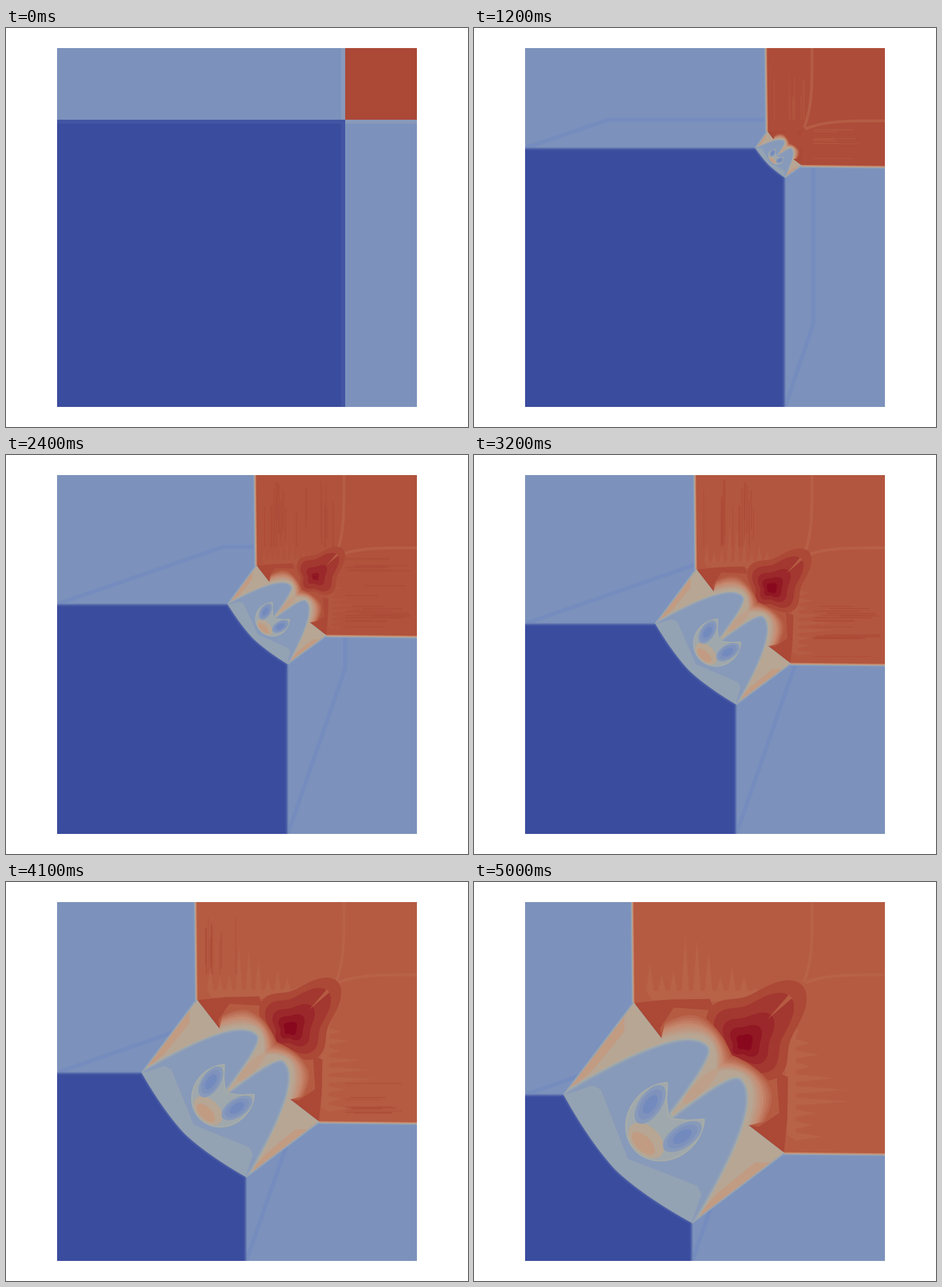
These frames come from a looping animation (805 px wide and 696 px high, 5100 ms). A matplotlib script:

```python
import numpy as np
import matplotlib.pyplot as plt
from matplotlib.animation import FuncAnimation
from matplotlib.patches import Polygon

W, H, DPI = 805, 696, 100
LEFT, TOP, RIGHT, BOTTOM = 89, 35, 716, 661
CX, CY = 591, 160            # where the four states meet
FRAMES = 51

BLUE = (58, 76, 158)
LIGHT = (124, 146, 188)
FAINT = (117, 140, 190)
DEEP = (115, 138, 190)
LOBE = (136, 154, 186)
MIST = (148, 163, 179)
GREY = (166, 172, 168)
BEIGE = (183, 166, 148)
SALMON = (194, 155, 131)
ORANGE = (198, 138, 112)
PALE_RED = (187, 103, 76)
RED = (171, 72, 54)
LATE_RED = (181, 91, 66)
DARK_RED = (138, 8, 30)

# Points are (u, v): along and across the diagonal, at full growth
TRIPLE, WING, DENT = (181.5, 130.5), (323, 111), (188.5, 75.5)
WEDGE = [TRIPLE, (148, 103), (112, 68), (118, 54), (151, 92), (181, 86), DENT]
STRIPE = [WING, (275, 108), (215, 114), (202, 127)]
BAND_EDGE = [WING, (290, 95), (286, 84), (323, 0)]

rng = np.random.default_rng(4)
STREAKS = rng.uniform((15, 0, 50, 1), (305, 70, 120, 3.5), (46, 4))

fig = plt.figure(figsize=(W / DPI, H / DPI), dpi=DPI, facecolor="white")
ax = fig.add_axes([LEFT / W, 1 - BOTTOM / H,
                   (RIGHT - LEFT) / W, (BOTTOM - TOP) / H])


def mix(c0, c1, k):
    return tuple(a + (b - a) * k for a, b in zip(c0, c1))


def add(pts, clip=None, **style):
    patch = ax.add_patch(Polygon(pts, **style))
    if clip is not None:
        patch.set_clip_path(clip)
    return patch


def fill(pts, color, alpha=1, clip=None):
    return add(pts, clip, facecolor=mix((0,) * 3, color, 1 / 255), lw=0,
               alpha=alpha)


def stroke(pts, color, width, closed=False, alpha=1, clip=None):
    return add(pts, clip, closed=closed, fill=False, alpha=alpha,
               edgecolor=mix((0,) * 3, color, 1 / 255),
               lw=width * 72 / DPI, joinstyle="bevel")


def box(x0, y0, x1, y1, color):
    fill([(x0, y0), (x1, y0), (x1, y1), (x0, y1)], color)


def both(draw_fn, pts, *args, **kw):
    """Draw a shape and its mirror image across the diagonal."""
    draw_fn(pts, *args, **kw)
    draw_fn(CX + CY - np.asarray(pts)[:, ::-1], *args, **kw)


def sym(half):
    half = np.asarray(half, float)
    return np.vstack([half, half[::-1] * (1, -1)])


def xy(uv):
    u, v = np.asarray(uv, float).T
    return np.column_stack([CX - u - v, CY + u - v])


def grown(uv, t):
    """Place points at growth t; the leading front speeds up slightly."""
    u, v = np.asarray(uv, float).T
    return xy(np.column_stack([u * t ** (.744 + .00086 * u), v * t ** 1.05]))


def oval(u, v, ru, rv, tilt=0):
    a = np.linspace(0, 2 * np.pi, 60)
    du = ru * np.cos(a)
    return np.column_stack([u + du, v + rv * np.sin(a) + tilt * du])


def bow_curve():
    v = np.linspace(WING[1], 0, 30)
    return np.column_stack([343 - 20 * (v / WING[1]) ** 1.6, v])


def lobe_curve():
    """From the wing around the rounded tip and back down the stem."""
    q = np.linspace(1, 0, 40)
    outer = np.column_stack([158 + 165 * q ** 2, 29 + 82 * q])
    stem = np.column_stack([158 + 93 * q ** 2, 29 - 24 * q])
    return np.vstack([outer, stem[::-1]])


def head_curve():
    a = np.linspace(2.35, 0, 40)
    arc = np.column_stack([258 + 51 * np.cos(a), 45 * np.sin(a)])
    return np.vstack([[(250, 3), (238, 18)], arc])


def jet_curve(k):
    """Front of the jet: k = 0 at the red side, 1 beside the lobes."""
    v = np.linspace(1, 0, 50)
    w = 88 * v - 46
    out = 132 + .0047 * w ** 2 + 9.2e-6 * np.maximum(w, 0) ** 4
    inner = 148 + .022 * (DENT[1] * v - 32) ** 2
    v = v * (88 + (DENT[1] - 88) * k)
    return np.vstack([[DENT], np.column_stack([out + (inner - out) * k, v])])


def spike_curve():
    """Ragged pale fringe above the red wedge."""
    x = np.linspace(300, 545, 37)
    height = rng.uniform(25, 105, 37) * np.clip((500 - x) / 120, .1, 1)
    y = 190 - np.where(np.arange(37) % 3 == 1, height, 0)
    x, y = np.append(x, [480, 310]), np.append(y, [210, 206])
    a, b = CX - x, y - CY
    return np.column_stack([(a + b) / 2, (a - b) / 2])


BOW, LOBES, HEAD, SPIKES = bow_curve(), lobe_curve(), head_curve(), spike_curve()


def draw_start():
    box(LEFT, CY, CX, BOTTOM, BLUE)
    box(LEFT, CY, CX, CY + 7, (66, 84, 163))
    box(CX - 7, CY, CX, BOTTOM, (66, 84, 163))
    box(CX - 7, TOP, CX, CY, LOBE)
    box(CX, CY, RIGHT, CY + 7, LOBE)
    box(CX, TOP, RIGHT, CY, RED)


def draw_low_states(n, t):
    """Faint advected waves and the blue quadrant."""
    bow = grown(sym(BOW), t)
    reach = LEFT + 12.08 * n
    wave = [(LEFT + 3, bow[0, 1] - 2), (reach, CY), (max(reach, CX), CY)]
    both(stroke, wave, FAINT, 7)
    far = LEFT - 20, BOTTOM + 20
    edge = np.vstack([[(far[0], bow[0, 1])], bow, [(bow[-1, 0], far[1])]])
    edge += (-2, 2)
    for k in (.2, .4, .6, .8):
        stroke(edge, mix(LIGHT, BLUE, k), 11 * (1 - k))
    fill(np.vstack([edge, [far]]), BLUE)
    stroke(edge, mix(LIGHT, BLUE, .85), 2)


def draw_streaks(t, reach):
    span = 125 * np.sin(np.pi * t ** .75) + 15
    early = t < .35
    for a, y, length, width in STREAKS:
        if 4 < reach - a < span:
            top = TOP + y + 35 * early
            line = [(CX - a, top), (CX - a, min(top + length, CY))]
            both(stroke, line, LATE_RED if early else RED, width, alpha=.5)


def draw_core(n, t):
    """Dark star with one long arm towards the meeting point."""
    center = 121.5 * t ** 1.13
    a = np.linspace(-np.pi, np.pi, 120)
    for i, size in enumerate((75, 60, 42, 27, 14)):
        k = np.clip((n - 10 - (75 - size) / 5) / 9, 0, 1)
        arm = .55 * min(1, size / 60) ** 2 * np.exp(-(a / .4) ** 2)
        r = size * t * k * (1 + .12 * np.cos(4 * a) + .25 * np.cos(a) + arm)
        r /= np.sqrt(2)
        star = np.column_stack([center - r * np.cos(a), r * np.sin(a)])
        fill(xy(star), mix(RED, DARK_RED, i / 4))
    if n > 20:
        notch = [(center - 42 * t, 0), (center - 82 * t, 3 * t),
                 (center - 82 * t, -3 * t)]
        fill(xy(notch), LATE_RED)


def draw_red(n, t):
    triple = grown([TRIPLE], t)[0]
    side = np.array([(triple[0] - 2, TOP - 20), triple])
    for color, width in [(mix(LIGHT, MIST, .5), 9), (MIST, 7),
                         (BEIGE, 5), (ORANGE, 3)]:
        both(stroke, side, color, width)
    rim = np.vstack([side, grown(sym([DENT]), t),
                     CX + CY - side[::-1, ::-1]])
    base = mix(RED, LATE_RED, min(1, 1.3 * t ** 1.2))
    fill(np.vstack([rim, [(RIGHT + 20, TOP - 20)]]) + (.5, -.5), base)
    draw_streaks(t, CX - triple[0])
    if n > 1:
        y = np.linspace(TOP, 174, 30)
        ridge = np.column_stack([589 - 14 * ((y - TOP) / 139) ** 4, y])
        both(stroke, ridge, PALE_RED, 5, alpha=.6)
    both(fill, grown(SPIKES, t), (184, 98, 72), alpha=np.clip(2 * t - .7, 0, 1))
    both(fill, grown(WEDGE, t), RED)
    draw_core(n, t)
    for k in np.linspace(0, 1, 9):
        color = (mix(LATE_RED, ORANGE, 2 * k) if k < .5
                 else mix(ORANGE, BEIGE, 2 * k - 1))
        fill(grown(sym(jet_curve(k)), t), color)


def draw_vortex(t):
    stroke(grown([WING, TRIPLE], t), MIST, 5)
    stroke(grown(np.array([WING, TRIPLE]) * (1, -1), t), MIST, 5)
    rim = sym(np.vstack([[WING, TRIPLE], jet_curve(1)]))
    body = fill(grown(np.vstack([rim, sym(BOW)[::-1]]), t), BEIGE)
    both(fill, grown(STRIPE, t), SALMON, clip=body)
    fill(grown(oval(196, 0, 30, 7), t), mix(BEIGE, SALMON, .6))

    lobes = grown(sym(LOBES), t)
    for k in (0, .35, .7):
        stroke(lobes, mix(GREY, LOBE, k), 2 + 10 * t * (1 - k), clip=body)
    fill(lobes, LOBE, clip=body)
    fill(grown(np.vstack([sym(BOW), sym(BAND_EDGE)[::-1]]), t), MIST)

    head = grown(sym(HEAD), t)
    fill(head, mix(MIST, GREY, .6))
    stroke(head, GREY, 3 * t, closed=True)
    fill(grown(oval(291, 0, 17, 26), t), BEIGE)
    fill(grown(oval(296, 0, 9, 18), t), SALMON)
    for i, k in enumerate((1, .78, .48)):
        both(fill, grown(oval(256, 28, 27 * k, 14 * k, -.14), t),
             mix(LOBE, DEEP, i / 2))


def draw(n):
    ax.cla()
    ax.set(xlim=(LEFT, RIGHT), ylim=(BOTTOM, TOP))
    ax.axis("off")
    box(LEFT, TOP, RIGHT, BOTTOM, LIGHT)
    if n == 0:
        draw_start()
    else:
        t = n / (FRAMES - 1)
        draw_low_states(n, t)
        draw_red(n, t)
        draw_vortex(t)
    return []


anim = FuncAnimation(fig, draw, frames=FRAMES, interval=100, repeat=True,
                     repeat_delay=0, blit=False)
plt.show()
```
